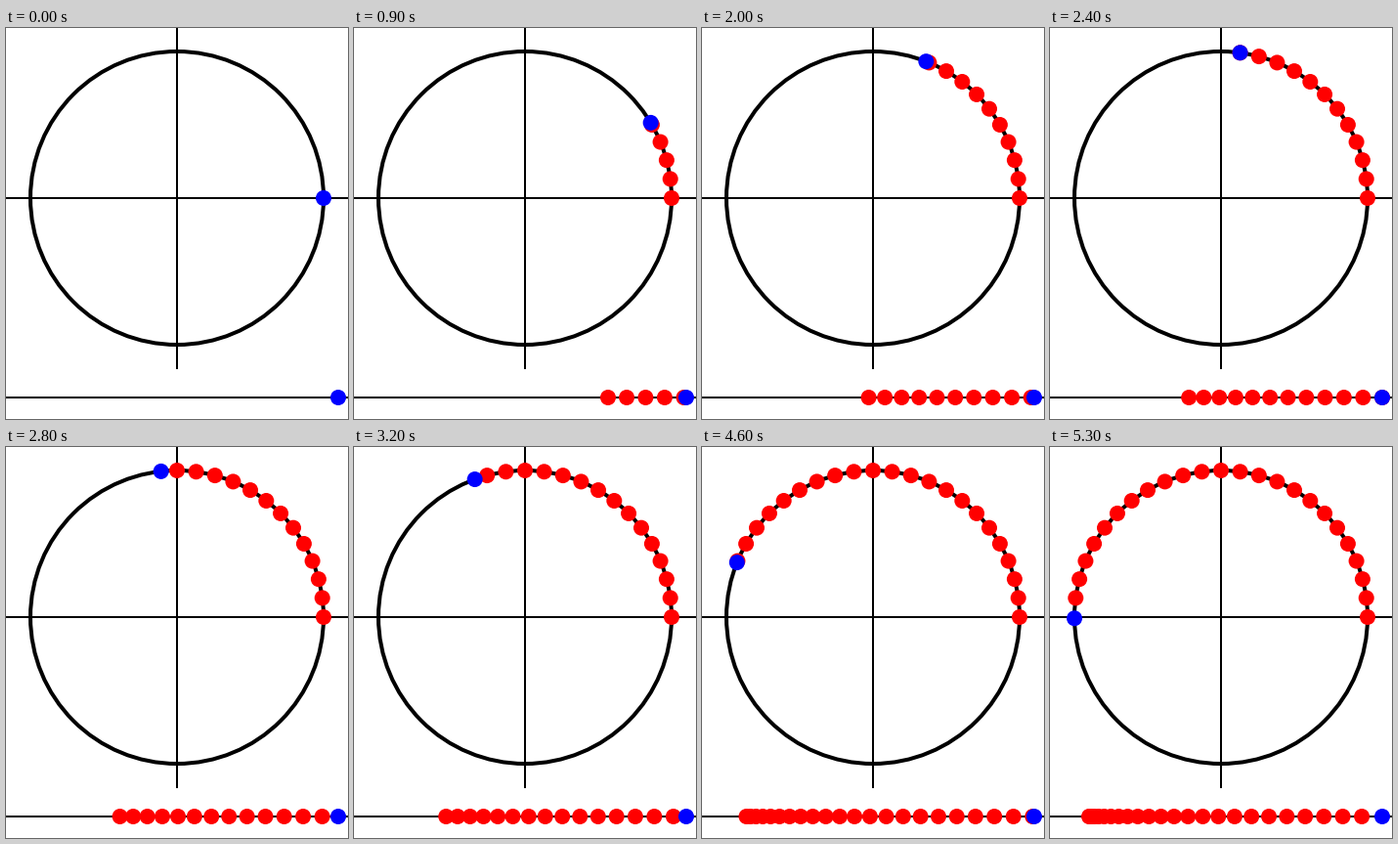
A matplotlib script that plays this animation: 350 by 400 pixels, repeating every 5700 ms.

```python
import numpy as np
import matplotlib.pyplot as plt
from matplotlib.animation import FuncAnimation
from matplotlib.patches import Circle

W, H, DPI = 350, 400, 100
CX, CY, R = 175, 174, 150
LINE_Y, LINE_X = 378, 340
DOT = 8
STEP = 0.06           # radians per frame
END = 3.15            # the leading dot rests here
MARKS = np.arange(24) * np.pi / 24
FRAMES, INTERVAL = 57, 100

fig = plt.figure(figsize=(W / DPI, H / DPI), dpi=DPI, facecolor="white")
ax = fig.add_axes([0, 0, 1, 1])
ax.set_xlim(0, W)
ax.set_ylim(H, 0)
ax.axis("off")


def px(width):
    return width * 72 / DPI


def line(xs, ys):
    ax.plot(xs, ys, color="black", lw=px(2), solid_capstyle="butt",
            snap=False, zorder=1)


def dot(x, y, color, zorder):
    patch = Circle((x, y), DOT, fc=color, ec="none", lw=0, snap=False,
                   zorder=zorder)
    return ax.add_patch(patch)


def on_circle(angle):
    return CX + R * np.cos(angle), CY - R * np.sin(angle)


line([0, W], [CY, CY])
line([CX, CX], [0, 349])
line([0, W], [LINE_Y, LINE_Y])
ax.add_patch(Circle((CX, CY), R, fill=False, ec="black", lw=px(4),
                    snap=False, zorder=2))

arc_dots = [dot(*on_circle(a), "#ff0000", 3) for a in MARKS]
chord_dots = [dot(LINE_X, LINE_Y, "#ff0000", 3) for _ in MARKS]
leader = dot(*on_circle(0), "#0000ff", 4)
anchor = dot(LINE_X, LINE_Y, "#0000ff", 4)


def draw(n):
    angle = min(n * STEP, END)
    leader.center = on_circle(angle)
    for mark, arc, chord in zip(MARKS, arc_dots, chord_dots):
        passed = bool(mark < angle)
        arc.set_visible(passed)
        chord.set_visible(passed)
        # distance along the line equals the chord to the leading dot
        length = 2 * R * np.sin((angle - mark) / 2)
        chord.center = (LINE_X - length, LINE_Y)
    return [*arc_dots, *chord_dots, leader, anchor]


anim = FuncAnimation(fig, draw, frames=FRAMES, interval=INTERVAL,
                     init_func=lambda: draw(0), repeat=True, repeat_delay=0,
                     blit=False)
plt.show()
```
